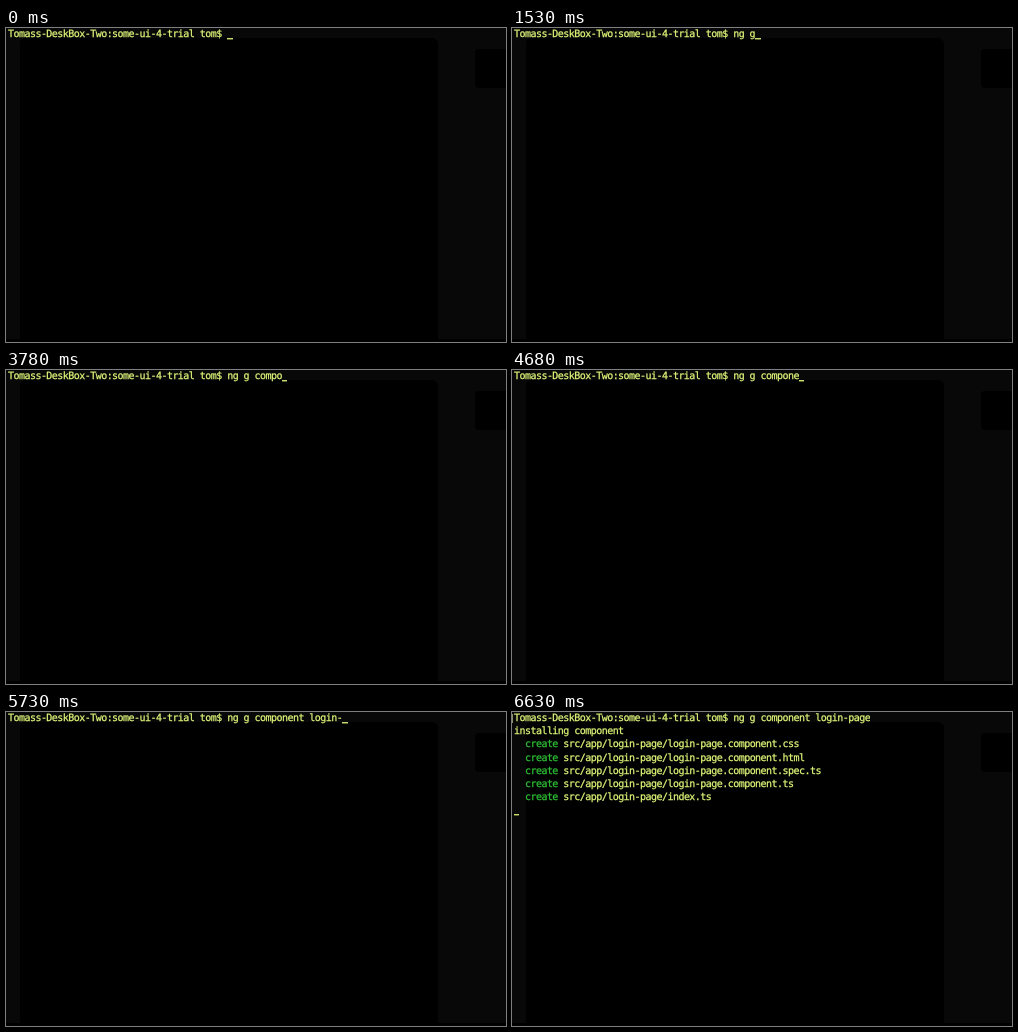
Animation, 500 px wide and 314 px high, one loop 8000 ms. Source, as an HTML page:

```html
<!DOCTYPE html>
<html lang="en">
<head>
<meta charset="utf-8">
<title>Terminal session</title>
<style>
  @property --n { syntax: "<integer>"; inherits: true; initial-value: 0; }

  html, body { margin: 0; width: 100%; height: 100%; overflow: hidden; background: #000; }

  .term {
    --w: 5.479px;
    --row: 13.17px;
    position: relative;
    width: 500px;
    height: 314px;
    overflow: hidden;
    background: #080808;
    color: #e0f87a;
    font: 10px/13.17px "DejaVu Sans Mono", "Liberation Mono", monospace;
    letter-spacing: -.541px;
    -webkit-text-stroke: .25px;
    text-rendering: geometricPrecision;
    white-space: pre;
    animation: type 8s step-end infinite;
  }
  .term div { position: absolute; }

  .panel { left: 14px; top: 10px; width: 418px; height: 304px; border-radius: 5px 6px 0 0; background: #000; }
  .tab { left: 469px; top: 21px; width: 35px; height: 39px; border-radius: 4px; background: #000; }
  .foot { left: 0; top: 311px; width: 500px; height: 3px; background: #000; }

  .prompt { left: 2px; top: 0; }
  .cmd {
    left: calc(2px + 40 * var(--w));
    top: 0;
    width: calc(var(--n) * var(--w));
    overflow: hidden;
  }
  .cursor { width: var(--w); height: 1px; background: #c8de6c; box-shadow: 0 1px #5a6431; }
  .typing {
    left: calc(2px + (40 + var(--n)) * var(--w));
    top: 10px;
    animation: before 8s step-end infinite;
  }

  .result { inset: 0; visibility: hidden; animation: after 8s step-end infinite; }
  .lines { left: 2px; top: var(--row); }
  .lines b { font-weight: normal; color: #2fc136; }
  .mark { left: 0; top: 2px; width: 1px; height: 9px; background: #8b8f66; }
  .waiting { left: 2px; top: calc(10px + 7 * var(--row)); }

  /* --n is the number of command characters typed */
  @keyframes type {
    0%      { --n: 0; }
    11.625% { --n: 2; }
    13.5%   { --n: 3; }
    19.125% { --n: 4; }
    32.25%  { --n: 5; }
    39.75%  { --n: 7; }
    41.625% { --n: 8; }
    43.5%   { --n: 9; }
    47.25%  { --n: 10; }
    58.5%   { --n: 12; }
    60.375% { --n: 13; }
    62.25%  { --n: 16; }
    64.125% { --n: 17; }
    66%     { --n: 18; }
    67.875% { --n: 20; }
    71.625% { --n: 21; }
    75.375% { --n: 22; }
    77.25%  { --n: 23; }
    79.125% { --n: 24; }
    81%, to { --n: 25; }
  }
  @keyframes before {
    0% { visibility: visible; }
    82.875%, to { visibility: hidden; }
  }
  @keyframes after {
    0% { visibility: hidden; }
    82.875%, to { visibility: visible; }
  }
</style>
</head>
<body>
<div class="term">
  <div class="panel"></div>
  <div class="tab"></div>
  <div class="foot"></div>
  <div class="prompt">Tomass-DeskBox-Two:some-ui-4-trial tom$ </div>
  <div class="cmd">ng g component login-page</div>
  <div class="cursor typing"></div>
  <div class="result">
    <div class="mark"></div>
    <div class="lines">installing component
  <b>create</b> src/app/login-page/login-page.component.css
  <b>create</b> src/app/login-page/login-page.component.html
  <b>create</b> src/app/login-page/login-page.component.spec.ts
  <b>create</b> src/app/login-page/login-page.component.ts
  <b>create</b> src/app/login-page/index.ts</div>
    <div class="cursor waiting"></div>
  </div>
</div>
</body>
</html>
```
